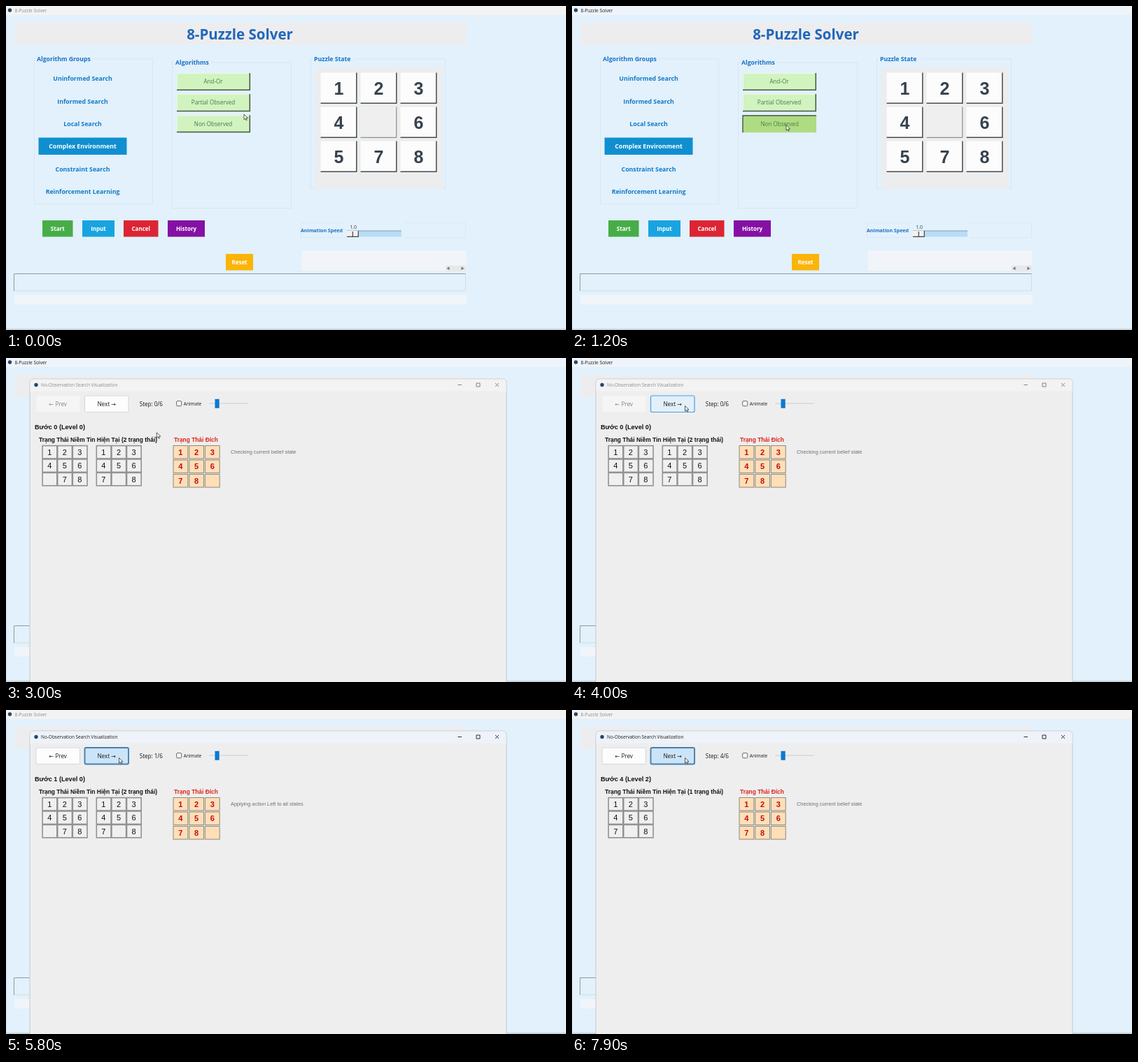
Animation, 800 px wide and 464 px high, one loop 8000 ms. Source, as an HTML page:

```html
<!DOCTYPE html>
<html lang="en">
<head>
<meta charset="utf-8">
<title>8-Puzzle Solver</title>
<style>
html, body { margin: 0; width: 100%; height: 100%; overflow: hidden; background: #e2f1fb; }
svg { display: block; width: 800px; height: 464px; }
.ui { font-family: "Open Sans", "DejaVu Sans", sans-serif; }
.ar { font-family: "Liberation Sans", Arial, sans-serif; }
.b { font-weight: bold; }
.m { text-anchor: middle; }
</style>
</head>
<body>
<svg id="stage" viewBox="0 0 800 464"></svg>
<script>
const LOOP = 8000;
const stage = document.getElementById('stage');

function el(parent, tag, attrs, text) {
  const node = document.createElementNS('http://www.w3.org/2000/svg', tag);
  for (const k in attrs) node.setAttribute(k, attrs[k]);
  if (text !== undefined) node.textContent = text;
  parent.appendChild(node);
  return node;
}
const set = (node, attrs) => { for (const k in attrs) node.setAttribute(k, attrs[k]); };
const show = (node, on) => node.setAttribute('display', on ? 'inline' : 'none');
const group = parent => el(parent, 'g', {});
const box = (p, x, y, w, h, fill, more) =>
  el(p, 'rect', { x, y, width: w, height: h, fill, ...more });
const path = (p, d, stroke, width = 1, fill = 'none') =>
  el(p, 'path', { d, stroke, 'stroke-width': width, fill });
const text = (p, x, y, size, fill, str, cls = 'ui') =>
  el(p, 'text', { x, y, 'font-size': size, fill, class: cls }, str);

// Tk style button edge: dark on the lower right when raised, upper left when sunken
const raised = (x, y, w, h) => `M${x + w - .7} ${y}V${y + h - .7}H${x}`;
const sunken = (x, y, w, h) => `M${x} ${y + h}V${y + .7}H${x + w}`;

// ---------- main window ----------
const main = group(stage);
box(main, 0, 0, 800, 464, '#e2f1fb');
const mainBar = box(main, 0, 0, 800, 13, '#f3f3f3');
el(main, 'circle', { cx: 5.5, cy: 6, r: 2.7, fill: '#26466f' });
const mainTitle = text(main, 12.5, 9, 6.55, '#8c8c8c', '8-Puzzle Solver');
box(main, 0, 462, 800, 2, '#cbd5db');
box(main, 0, 13, .8, 449, '#cfdde6');
box(main, 12, 24, 646, 31.5, '#ededef');
text(main, 334, 48, 20.5, '#2068bb', '8-Puzzle Solver', 'ui b m');

function frame(x, y, w, h, label, lx) {
  box(main, x, y, w, h, 'none', { stroke: '#cddae2', 'stroke-width': 1, 'stroke-dasharray': '1 1' });
  box(main, lx - 2, y - 5, label.length * 5 + 2, 10, '#e2f1fb');
  text(main, lx, y + 3.2, 8.7, '#1a70c6', label, 'ui b');
}
frame(40.5, 75.5, 169, 208, 'Algorithm Groups', 44);
frame(237.5, 81, 170, 208.5, 'Algorithms', 242);
frame(435.5, 75.5, 192, 186, 'Puzzle State', 440);

box(main, 46.5, 188.5, 126, 24.5, '#108fd0');
['Uninformed Search', 'Informed Search', 'Local Search', 'Complex Environment',
  'Constraint Search', 'Reinforcement Learning'].forEach((name, i) =>
  text(main, 109.5, 107.4 + i * 32.35, 8.75, i === 3 ? '#ffffff' : '#127ac8', name, 'ui b m'));

const algos = ['And-Or', 'Partial Observed', 'Non Observed'].map((name, i) => {
  const y = 96 + i * 30.1;
  const rect = box(main, 244, y, 105, 25, '#d0f3bf');
  path(main, `M244.5 ${y + 25}V${y + .5}H349`, '#e8fadf');
  const edge = path(main, raised(244, y, 105, 25), '#465545', 1.5);
  const label = text(main, 296, y + 15.3, 8.05, '#4d7a45', name, 'ui m');
  return { y, rect, edge, label };
});

box(main, 442, 88, 182, 174, '#ebedee');
[1, 2, 3, 4, 0, 6, 5, 7, 8].forEach((n, i) => {
  const x = 449.5 + (i % 3) * 57, y = 95.5 + Math.floor(i / 3) * 49;
  box(main, x, y, 52, 44.5, n ? '#fcfcfc' : '#efefef');
  path(main, raised(x, y, 52, 44.5), n ? '#4a4a4a' : '#77797a', n ? 1.5 : 1);
  if (n) text(main, x + 26, y + 31, 25, '#36434f', n, 'ar b m');
});

[['Start', 52, 307, 43.5, '#47ad48'], ['Input', 109, 307, 46, '#18a4e0'],
  ['Cancel', 168, 307, 49.5, '#dc2434'], ['History', 231, 307, 53, '#8510a4'],
  ['Reset', 314, 355, 39, '#fbb407']].forEach(([name, x, y, w, fill]) => {
  box(main, x, y, w, 23.5, fill);
  text(main, x + w / 2, y + 14.7, 8, '#ffffff', name, 'ui b m');
});

box(main, 421.5, 310.5, 235, 21, 'none', { stroke: '#d2dee6', 'stroke-dasharray': '1 1' });
box(main, 485.5, 308, 83, 25, '#e2f1fb');
text(main, 421, 323.7, 7.05, '#1a70c6', 'Animation Speed', 'ui b');
text(main, 496, 318.8, 6.8, '#333333', '1.0', 'ui m');
box(main, 487, 322, 78, 8.5, '#b9ddf6');
path(main, 'M487 322H565', '#7e98a8', .9);
box(main, 487, 322, 16.5, 8.5, '#f2f2f2');
path(main, 'M503.3 322V330.3H487M495.3 323V330', '#444444', 1.2);

box(main, 422.5, 350, 235, 29.5, '#f1f5fa');
box(main, 628, 371.5, 29, 8, '#e8e8e9');
path(main, 'M633.5 373.2V378.2L629.5 375.7Z', 'none', 0, '#777777');
path(main, 'M650.5 373.2V378.2L654.5 375.7Z', 'none', 0, '#777777');

path(main, 'M11.5 408V383.5H656.5', '#8d9ba3');
path(main, 'M12 407.8H656.5V384', '#cfdae1', .8);
box(main, 12, 414, 646, 13.5, '#f1f5fa');

// ---------- popup ----------
const popup = group(stage);
box(popup, 34, 30, 681, 440, '#eeeeee', { rx: 5, stroke: '#c3cacf', 'stroke-width': 1 });
const popBar = path(popup, 'M34.5 47.5V35Q34.5 30.5 39 30.5H710Q714.5 30.5 714.5 35V47.5Z', 'none', 0, '#f3f3f3');
el(popup, 'circle', { cx: 43, cy: 38.5, r: 2.7, fill: '#26466f' });
const popTitle = text(popup, 50, 40.9, 6.47, '#8c8c8c', 'No-Observation Search Visualization');
const controls = path(popup,
  'M645.5 38.5H651M672 36H677V41H672ZM699 36L704 41M704 36L699 41', '#777777', .9);

const body = group(popup);
function button(x, w, label) {
  const rect = box(body, x, 54, w, 23.5, '#fdfdfd', { rx: 2 });
  const name = text(body, x + w / 2, 68.7, 8.1, '#1a1a1a', label, 'ui m');
  return { rect, name };
}
const prev = button(43, 62.5, '← Prev');
const next = button(112.5, 62.5, 'Next →');
const stepText = text(body, 190.7, 68.6, 8.1, '#1a1a1a', '');
box(body, 243.7, 61.7, 7, 7, '#fafafa', { rx: 1.2, stroke: '#555555', 'stroke-width': .9 });
text(body, 253.8, 67.8, 6.5, '#1a1a1a', 'Animate');
box(body, 290, 64.4, 56, 1.4, '#d6d6d6');
box(body, 298.5, 58.8, 6.2, 13, '#0b79d4');

const levelText = text(body, 41, 101.6, 9.15, '#111111', '', 'ar b');
const beliefText = text(body, 47, 119.7, 8.45, '#111111', '', 'ar b');
text(body, 240, 119.7, 8.4, '#dd2416', 'Trạng Thái Đích', 'ar b');
const note = text(body, 321, 136.9, 7.38, '#707070', '', 'ar');

function board(x0) {
  const g = group(body), digits = [];
  box(g, x0, 124.8, 65.5, 58.8, '#929292');
  for (let i = 0; i < 9; i++) {
    const x = x0 + (i % 3) * 21.6, y = 124.8 + Math.floor(i / 3) * 19.4;
    box(g, x + 1.6, y + 1.6, 19.1, 16.8, '#f0f0f0');
    digits.push(text(g, x + 10.9, y + 13.9, 11, '#111111', '', 'ar m'));
  }
  return { g, fill: s => digits.forEach((d, i) => { d.textContent = s[i]; }) };
}
const boards = [board(51.3), board(128.5)];

[...'12345678 '].forEach((n, i) => {
  const x = 239 + (i % 3) * 22.7, y = 125.5 + Math.floor(i / 3) * 20.5;
  box(body, x, y, 20.8, 18.6, '#ffdfb6', { stroke: '#8c8780', 'stroke-width': 1 });
  text(body, x + 10.4, y + 13.2, 11, '#c00a1c', n, 'ar b m');
});

// ---------- pointer ----------
const pointer = path(stage, 'M0 0V7.6L1.8 6L3 8.7L4.2 8.2L3.1 5.5H5.5Z', '#333333', .8, '#ffffff');

// ---------- timeline ----------
const PRESS = 1000, OPEN = 1500, FILLED = 1700, FOCUS = 5400;
const left = '123456 78', right = '1234567 8';
const checking = 'Checking current belief state';
const steps = [
  { at: 0, level: 0, states: [left, right], note: checking },
  { at: 5700, level: 0, states: [left, right], note: 'Applying action Left to all states' },
  { at: 6300, level: 1, states: [left], note: checking },
  { at: 7000, level: 1, states: [left], note: 'Applying action Right to all states' },
  { at: 7600, level: 2, states: [right], note: checking }
];
const track = [[0, 340, 155], [100, 340, 155], [800, 306, 170.5], [1400, 306, 170.5],
  [1700, 305, 170.5], [2300, 305, 170.5], [3500, 161.5, 68.5], [LOOP, 161.5, 68.5]];

function pointerAt(t) {
  let i = 1;
  while (i < track.length - 1 && t > track[i][0]) i++;
  const [t0, x0, y0] = track[i - 1], [t1, x1, y1] = track[i];
  const u = (t - t0) / (t1 - t0), e = u * u * (3 - 2 * u);
  return [x0 + (x1 - x0) * e, y0 + (y1 - y0) * e];
}

function titleBars(t) {
  const mainOn = t >= PRESS && t < FOCUS, popOn = t >= FOCUS;
  set(mainBar, { fill: mainOn ? '#eff4fa' : '#f3f3f3' });
  set(mainTitle, { fill: mainOn ? '#1a1a1a' : '#8c8c8c' });
  set(popBar, { fill: popOn ? '#eef3fa' : '#f3f3f3' });
  set(popTitle, { fill: popOn ? '#1a1a1a' : '#8c8c8c' });
  set(controls, { stroke: popOn ? '#1a1a1a' : '#777777' });
}

function algoButtons(t, px, py) {
  algos.forEach(({ y, rect, edge, label }, i) => {
    const over = px > 244 && px < 349 && py > y + 1 && py < y + 25;
    const down = i === 2 && t >= PRESS && t < OPEN;
    set(rect, { fill: over ? '#aedc82' : '#d0f3bf' });
    set(edge, { d: (down ? sunken : raised)(244, y, 105, 25) });
    set(label, { x: down ? 296.7 : 296, y: y + (down ? 16 : 15.3) });
  });
}

function popupButtons(t, step, px, py) {
  const over = px > 112 && px < 175 && py > 54 && py < 78;
  const look = t >= FOCUS ? ['#cce4f7', '#4680b2', 1.9]
    : over ? ['#e3f0fa', '#4a9fdf', 1.2] : ['#fdfdfd', '#d2d2d2', .9];
  set(next.rect, { fill: look[0], stroke: look[1], 'stroke-width': look[2] });
  set(prev.rect, { fill: step ? '#fdfdfd' : '#f5f5f5', stroke: step ? '#d2d2d2' : '#f0f0f0', 'stroke-width': .9 });
  set(prev.name, { fill: step ? '#1a1a1a' : '#858585' });
}

function render(t) {
  const [px, py] = pointerAt(t);
  const n = steps.filter(s => t >= s.at).length - 1, s = steps[n];
  set(pointer, { transform: `translate(${px} ${py})` });
  titleBars(t);
  algoButtons(t, px, py);
  popupButtons(t, n, px, py);
  show(popup, t >= OPEN);
  show(body, t >= FILLED);
  stepText.textContent = `Step: ${n}/6`;
  levelText.textContent = `Bước ${n} (Level ${s.level})`;
  beliefText.textContent = `Trạng Thái Niềm Tin Hiện Tại (${s.states.length} trạng thái)`;
  note.textContent = s.note;
  boards.forEach((b, i) => {
    show(b.g, i < s.states.length);
    if (s.states[i]) b.fill(s.states[i]);
  });
}

const start = performance.now();
function tick() {
  render((performance.now() - start) % LOOP);
  requestAnimationFrame(tick);
}
tick();
</script>
</body>
</html>
```
